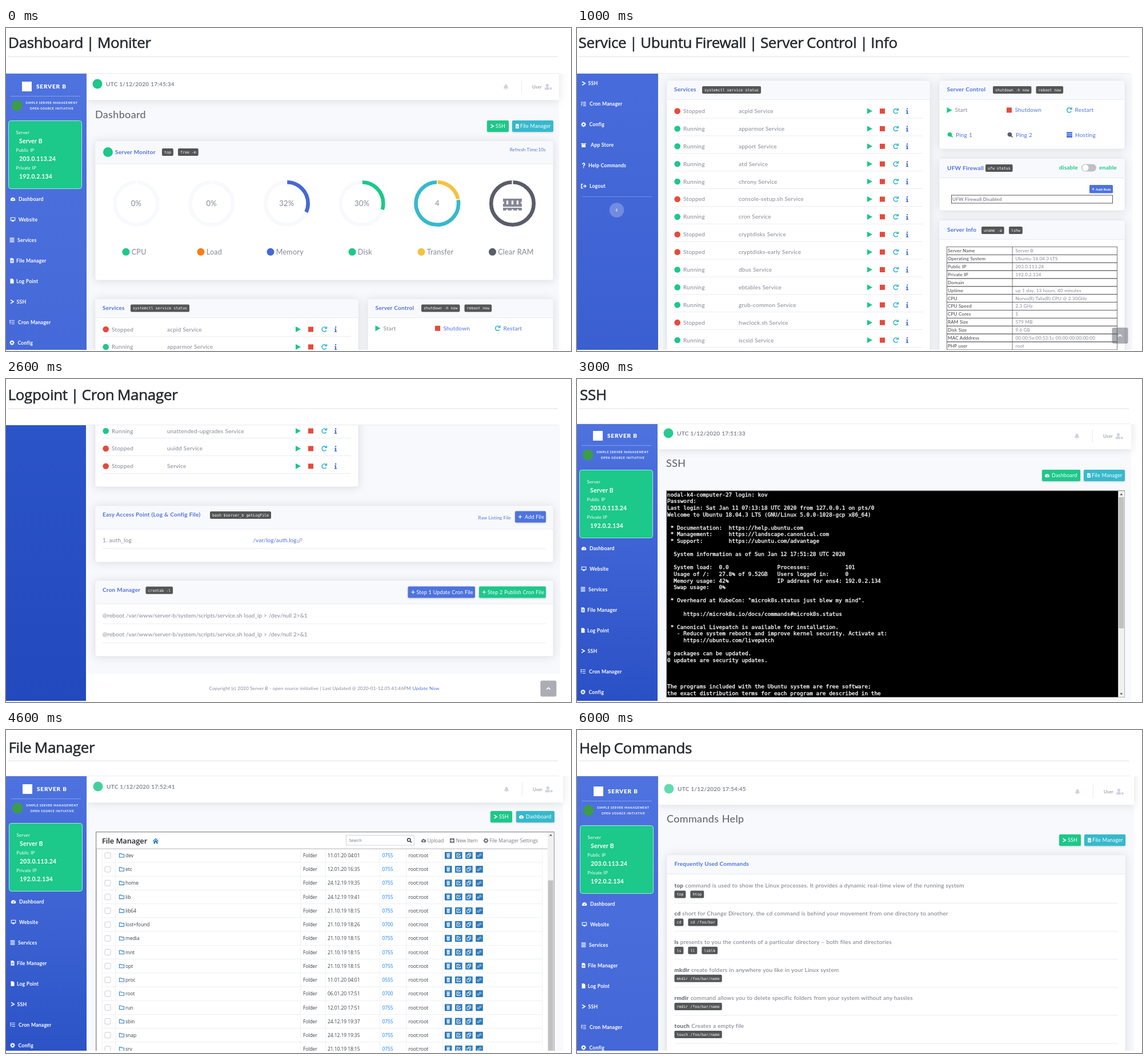
An HTML page that plays this animation: 989x566 px, repeating every 7 s.

```html
<!DOCTYPE html>
<html lang="en">
<head>
<meta charset="utf-8">
<title>Server dashboard tour</title>
<style>
html, body { margin: 0; width: 100%; height: 100%; overflow: hidden; background: #fff; }
.scene { position: absolute; left: 0; top: 0; width: 989px; height: 566px; animation: show 7s step-end infinite; animation-delay: calc((var(--i) - 7) * 1s); }
@keyframes show { 0% { visibility: visible; } 14.28572%, 100% { visibility: hidden; } }
text { font-family: Lato, sans-serif; letter-spacing: .02em; word-spacing: .02em; }
.ui { font-family: "Open Sans", "Noto Sans", sans-serif; letter-spacing: -.01em; word-spacing: 0; }
.title { letter-spacing: -.32px; word-spacing: -1px; stroke: #24292e; stroke-width: .55px; }
.code { font-family: "DejaVu Sans Mono", monospace; letter-spacing: 0; word-spacing: 0; }
.bright { stroke: #fff; stroke-width: .35px; }
.path { letter-spacing: .005em; }
.brand { letter-spacing: .08em; }
.tag { letter-spacing: .11em; }
.card { filter: drop-shadow(0 1.5px 8px rgba(58, 59, 69, .15)); }
.btn { filter: drop-shadow(0 1px 1.5px rgba(58, 59, 69, .25)); }
</style>
</head>
<body>
<script>
const GREEN = '#1cc88a', BLUE = '#4e73df', RED = '#e74a3b', CYAN = '#36b9cc', YELLOW = '#f6c23e';
const GRAY = '#858796', DARK = '#5a5c69', LINE = '#e3e6f0', PALE = '#f8f9fc', BOLD = 'font-weight="700"';
const MID = 'text-anchor="middle"';

// Icons sit in a 10 by 10 box around the origin; a second entry is a stroke width.
const ICONS = {
  play: ['M-4-5L5 0L-4 5Z'],
  stop: ['M-4.5-4.5h9v9h-9z'],
  redo: ['M3.2-2.6A4 4 0 1 0 3.6 2M4.4-5V-1.6H1', 1.6],
  info: ['M-2-1.5H1V3.5H2V5H-2V3.5H-1V0H-2ZM-1-5H1.2V-2.8H-1Z'],
  file: ['M-3.5-5H1.5L3.5-3V5H-3.5ZM-2-.5h4v1h-4zM-2 2h4v1h-4z'],
  page: ['M-3.5-5H1L3.5-2.5V5H-3.5Z'],
  gauge: ['M-5 2A5 5 0 1 1 5 2L4 4H-4ZM-.8 2.2L2-2.5L1 2.5Z'],
  desk: ['M-5-4.5H5V2.5H-5ZM-3.8-3.3V1.2H3.8V-3.3ZM-1.5 2.5H1.5L2.3 4.5H-2.3Z'],
  rows: ['M-4.5-4h9m-9 2.7h9m-9 2.6h9m-9 2.7h9', 1.5],
  prompt: ['M-3-3.6L3 0L-3 3.6', 1.9],
  list: ['M-1-3.5H5M-1 0H5M-1 3.5H5M-5-3.5l1 1 1.6-2M-5 0l1 1 1.6-2M-4.5 3.5h1.4', 1.3],
  cog: ['M-2.8 0A2.8 2.8 0 1 0 2.8 0A2.8 2.8 0 1 0-2.8 0M0-5v2M0 5v-2M-5 0h2M5 0h-2M-3.5-3.5l1.3 1.3M3.5 3.5l-1.3-1.3M-3.5 3.5l1.3-1.3M3.5-3.5l-1.3 1.3', 2],
  box: ['M-5-4L0-3L5-4L4-.8H-4ZM-4 0H4V4.5H-4Z'],
  ask: ['M-2-2.5A2.2 2.2 0 1 1 .8-.6L0 .4V1.6M0 3.2V5', 1.8],
  exit: ['M-1-4H-4.5V4H-1M-1.5 0H4.5M2-2.8L4.8 0L2 2.8', 1.6],
  bell: ['M-4.3 3C-2.5 1.5-3.5-4 0-4.5C3.5-4 2.5 1.5 4.3 3ZM-1.3 3.7H1.3A1.3 1.3 0 0 1-1.3 3.7Z'],
  user: ['M-4-2.5a2.5 2.5 0 1 1 5 0a2.5 2.5 0 1 1-5 0ZM-6 5C-6 1-4 .5-1.5 .5C0 .5 1 .8 1.6 1.6L2 5ZM2.5 3a2 2 0 1 1 4 0a2 2 0 1 1-4 0Z'],
  save: ['M-1-5H1V-1.7H3.2L0 1.6L-3.2-1.7H-1ZM-5 1.6H-2.3L0 3.6L2.3 1.6H5V5H-5Z'],
  trash: ['M-4-5H4V-3.6H-4ZM-3.4-2.8H3.4L3 5H-3ZM-1.6-1h.8v4.5h-.8zM.8-1h.8v4.5h-.8z'],
  link: ['M-.5-1.5L1.5-3.5A2 2 0 0 1 4-.8L2.2 1.2M.5 1.5L-1.5 3.5A2 2 0 0 1-4 .8L-2.2-1.2M-1.2 1.2L1.2-1.2', 1.3],
  edit: ['M1-4H-4V4H4V.5M-1.2 1.2L4-4', 1.5],
  copy: ['M-4.5-2H1V4.5H-4.5ZM-1.5-2V-4.5H4V1.5H1', 1.3],
  folder: ['M-4.5-3.5H-1L0-2.3H4.5V3.5H-4.5Z', 1.2],
  home: ['M-5.2 0L0-5L5.2 0L4.3 .8L0-3.2L-4.3 .8ZM-3.5 1.2L0-2L3.5 1.2V4.8H1V2H-1V4.8H-3.5Z'],
  cloud: ['M-3 3.5A2.4 2.4 0 0 1-3.4-1A3 3 0 0 1 2.2-2A2.8 2.8 0 0 1 3 3.5ZM0-1.2L2 .9H.7V2.6H-.7V.9H-2Z'],
  plus: ['M-4 0H4M0-4V4', 1.5],
  add: ['M-4.5-4.5h9v9h-9zM-.8-3v2.2H-3V.8H-.8V3H.8V.8H3V-.8H.8V-3Z'],
  lens: ['M-4-1A3.2 3.2 0 1 0 2.4-1A3.2 3.2 0 1 0-4-1M1.6 1.4L4.6 4.4', 1.7],
  bat: ['M-4.5-1A4 4 0 1 1 3 1.5L5 4L3.8 5L1.5 2.8A4 4 0 0 1-4.5-1Z'],
  rack: ['M-5-4.8H5V-2H-5ZM-5-1.4H5V1.4H-5ZM-5 2H5V4.8H-5Z'],
  ram: ['M-5-3.2H5V-1.6A.6.6 0 0 0 5-.4V1.1H-5V-.4A.6.6 0 0 0-5-1.6ZM-3.2-2.1v2h1v-2zM-.5-2.1v2h1v-2zM2.2-2.1v2h1v-2zM-5 1.7H5V3.1H3.2V2.4H2.5V3.1H.4V2.4H-.4V3.1H-2.5V2.4H-3.2V3.1H-5Z'],
  up: ['M-4 2L0-2L4 2', 2],
  left: ['M2-4L-2 0L2 4', 2]
};

const rect = (x, y, w, h, fill, more = '') => `<rect x="${x}" y="${y}" width="${w}" height="${h}" fill="${fill}" ${more}/>`;
const dot = (x, y, r, fill) => `<circle cx="${x}" cy="${y}" r="${r}" fill="${fill}"/>`;
const text = (x, y, s, size = 10.06, fill = GRAY, more = '') => `<text x="${x}" y="${y}" font-size="${size}" fill="${fill}" ${more}>${s}</text>`;
const ui = (x, y, s, size, fill, more = '') => text(x, y, s, size, fill, `class="ui" ${more}`);
const hline = (x1, x2, y, c = LINE) => rect(x1, y - .4, x2 - x1, .8, c);
const move = (dx, dy, s) => `<g transform="translate(${dx} ${dy})">${s}</g>`;
const each = (list, fn) => list.map(fn).join('');

function icon(name, x, y, color, size = 10) {
  const [d, w] = ICONS[name];
  const paint = w ? `fill="none" stroke="${color}" stroke-width="${w}"` : `fill="${color}" fill-rule="evenodd"`;
  return `<path d="${d}" ${paint} transform="translate(${x} ${y}) scale(${size / 10})"/>`;
}
const kbd = (x, y, s) => rect(x, y - 6.5, s.length * 3.96 + 8, 13, '#545557', 'rx="2"') +
  text(x + 4, y + 2.3, s, 6.58, '#fff', 'class="code"');
const heading = (x, y, s) => text(x, y, s, 18, DARK);
const head = (x, y, s) => text(x, y, s, 10.06, BLUE, BOLD);
const card = (x, y, w, h, top) => rect(x, y, w, h, '#fff', `rx="3.5" stroke="${LINE}" stroke-width=".7" class="card"`) +
  (top ? rect(x + .4, y + .4, w - .8, top, PALE, 'rx="3"') + hline(x, x + w, y + top) : '');
const button = (x, y, w, color, pic, label, gap = 15) => rect(x, y, w, 20, color, 'rx="2" class="btn"') +
  icon(pic, x + 9, y + 10, '#fff', 8) + text(x + gap, y + 13.3, label, 9, '#fff');
const fileButton = (x, y) => button(x, y, 72, CYAN, 'file', 'File Manager', 14);
const sshButton = (x, y) => button(x, y, 38, GREEN, 'prompt', 'SSH');
const toTop = (x, y) => rect(x, y, 28, 28, DARK, 'rx="3" opacity=".5"') + icon('up', x + 14, y + 14, '#fff', 8);

const HOST = 'Server B', PUBLIC = '203.0.113.24', PRIVATE = '192.0.2.134';
const MENU = [['gauge', 'Dashboard', 22], ['desk', 'Website', 22], ['rows', 'Services', 20], ['file', 'File Manager', 18],
  ['page', 'Log Point', 18], ['prompt', 'SSH', 18.5], ['list', 'Cron Manager', 21], ['cog', 'Config', 20.5],
  ['box', 'App Store', 23], ['ask', 'Help Commands', 19], ['exit', 'Logout', 21]];

function sidebar() {
  const facts = [['Server', HOST], ['Public IP', PUBLIC], ['Private IP', PRIVATE]];
  return rect(28, 94, 17, 17, '#fff') +
    text(53, 106, 'SERVER B', 10.06, '#fff', 'font-weight="900" class="brand"') +
    hline(8, 130, 119.5, '#94abec') + dot(19, 136, 9.5, '#3c9c4a') +
    text(80, 133, 'SIMPLE SERVER MANAGEMENT', 5.2, '#fff', `${BOLD} ${MID} class="tag"`) +
    text(80, 143, 'OPEN SOURCE INITIATIVE', 5.2, '#fff', `${BOLD} ${MID} class="tag"`) +
    rect(4.5, 162.5, 128, 119, GREEN, 'rx="4" stroke="#a4ecd2"') +
    each(facts, ([k, v], i) => text(17.5, 186.2 + i * 30.9, k, 8, '#fff') + text(23, 201.7 + i * 30.9, v, 10.4, '#fff', BOLD)) +
    each(MENU, ([pic, s, x], i) => icon(pic, pic === 'desk' || pic === 'gauge' ? 12 : 10.5, 299.5 + i * 36, '#fff', 8.6) +
      text(x, 302.6 + i * 36, s, 8.7, '#fff', BOLD)) +
    hline(8, 130, 678, '#7e9ae8') + '<circle cx="68.5" cy="701.5" r="12.8" fill="#fff" opacity=".25"/>' +
    icon('left', 68.5, 701.5, '#dfe6fa', 6);
}

function topbar(time, glow, right) {
  return rect(141, 50, right - 141, 76, '#fff', 'class="card"') + dot(160, 98, 8.5, glow) +
    text(175, 101.8, 'UTC 1/12/2020 ' + time, 10.06, GRAY, BOLD) + icon('bell', 875, 103, '#d1d3e2') +
    rect(902, 91, .8, 24, LINE) + text(921, 106, 'User', 8) + icon('user', 949, 103, '#d1d3e2', 10.5);
}

// One scrollable view: side bar, header and body, moved together.
const shell = (dx, dy, right, time, glow, body, side) => rect(141, 0, right - 141, 566, PALE) + body +
  move(dx, dy, topbar(time, glow, right - dx)) + side + move(dx, dy, sidebar());

function arc(x, from, to, color) {
  return `<circle cx="${x}" cy="307.5" r="37.3" fill="none" stroke="${color}" stroke-width="6.6" pathLength="100"
    stroke-dasharray="${to - from} 100" stroke-dashoffset="${-from}" transform="rotate(-90 ${x} 307.5)"/>`;
}
const notch = (x, pct) => `<rect x="${x - .8}" y="266" width="1.6" height="9" fill="#fff" transform="rotate(${pct * 3.6} ${x} 307.5)"/>`;

function monitor() {
  const gauges = [['CPU', '0%', GREEN, 0, 210], ['Load', '0%', '#fd7e14', 0, 341], ['Memory', '32%', '#4468d6', 32, 463],
    ['Disk', '30%', GREEN, 30, 606], ['Transfer', '4', YELLOW, 22, 727], ['Clear RAM', '', DARK, 100, 851.5]];
  return heading(156, 157.5, 'Dashboard') + sshButton(842, 162) + fileButton(886, 162) +
    card(156, 198, 802, 244, 40) + dot(178.5, 217.5, 8.5, GREEN) + head(191, 220.5, 'Server Monitor') +
    kbd(273, 217.5, 'top') + kbd(301, 217.5, 'free -m') + text(945, 215.6, 'Refresh Time:10s', 8, BLUE, 'text-anchor="end"') +
    each(gauges, ([name, value, color, pct, x], i) => {
      const cx = 228 + i * 131.7;
      return arc(cx, pct, 100, name === 'Transfer' ? CYAN : PALE) + (pct ? arc(cx, 0, pct, color) : '') +
        notch(cx, 0) + notch(cx, pct) + text(cx, 312.2, value, 13, GRAY, MID) +
        dot(x, 392.3, 6.5, color) + text(x + 9.7, 397, name, 12.6);
    }) + icon('ram', 886.5, 309.5, GRAY, 33);
}

const actions = (x, y) => icon('play', x, y, GREEN) + icon('stop', x + 22.5, y, RED) + icon('redo', x + 46, y, CYAN) + icon('info', x + 66, y, BLUE);
function service(name, y) {
  const off = name[0] === '!';
  return dot(174.7, y, 5.3, off ? RED : GREEN) + text(185, y + 3.5, off ? 'Stopped' : 'Running') +
    text(282, y + 3.5, name.replace('!', '')) + actions(511, y) + hline(169, 604, y + 12.5);
}

function lowerCards() {
  const names = ['!acpid', 'apparmor', 'apport', 'atd', 'chrony', '!console-setup.sh', 'cron', '!cryptdisks', '!cryptdisks-early',
    'dbus', 'ebtables', 'grub-common', '!hwclock.sh', 'iscsid'];
  const info = [['Server Name', HOST], ['Operating System', 'Ubuntu 18.04.3 LTS'], ['Public IP', PUBLIC], ['Private IP', PRIVATE],
    ['Domain', ''], ['Uptime', 'up 1 day, 13 hours, 40 minutes'], ['CPU', 'Norvo(R) Talix(R) CPU @ 2.30GHz'], ['CPU Speed', '2.3 GHz'],
    ['CPU Cores', '1'], ['RAM Size', '579 MB'], ['Disk Size', '9.6 GB'], ['MAC Adddress', '00:00:5e:00:53:1c 00:00:00:00:00:00'], ['PHP user', 'root']];
  const cell = (x, pic, color, s, y, ink = BLUE, gap = 10) => icon(pic, x, y, color) + text(x + gap, y + 3.5, s, 10.06, ink);
  return card(156, 474.5, 461, 600, 33) + head(169, 493.6, 'Services') + kbd(218, 491, 'systemctl service status') +
    each(names, (n, i) => service(n + ' Service', 528 + i * 30.88)) +
    card(633, 474.5, 325, 120, 33) + head(646.5, 493.6, 'Server Control') + kbd(727, 491, 'shutdown -h now') + kbd(802.5, 491, 'reboot now') +
    cell(650.5, 'play', GREEN, 'Start', 526.3, GRAY) + cell(755.5, 'stop', RED, 'Shutdown', 526.3) + cell(860.5, 'redo', CYAN, 'Restart', 526.3) +
    cell(652, 'bat', GREEN, 'Ping 1', 569.5) + cell(757, 'bat', DARK, 'Ping 2', 569.5) + cell(861, 'rack', BLUE, 'Hosting', 569.5) +
    move(-1, 382.4, card(634, 228.5, 325, 91.5, 34) + head(648, 248.5, 'UFW Firewall') + kbd(715, 245.5, 'ufw status') +
      text(844, 248.3, 'disable', 10.06, GREEN, BOLD) + text(914, 248.3, 'enable', 10.06, GREEN, BOLD) +
      rect(883, 238.5, 26, 13, '#c0c0c4', 'rx="6.5"') + dot(890, 245, 5.5, '#fff') +
      rect(897, 275, 41, 14.5, BLUE, 'rx="1.5"') + icon('plus', 903.5, 282.3, '#fff', 5.5) + text(908, 284.5, 'Add Rule', 6.4, '#fff', BOLD) +
      rect(655.5, 293, 282, 14, 'none', 'stroke="#444" stroke-width=".9"') + text(657, 302.9, 'UFW Firewall Disabled', 8.1, GRAY, BOLD) +
      card(634, 336.5, 325, 330, 34) + head(648, 357, 'Server Info') + kbd(708, 354.5, 'uname -a') + kbd(756, 354.5, 'lshw') +
      each(info, ([k, v], i) => {
        const y = 383.5 + i * 13.87;
        return rect(647.5, y, 298, 13.87, 'none', 'stroke="#555" stroke-width=".8"') + rect(761.7, y, .8, 13.87, '#555') +
          text(649, y + 9.9, k, 8.1, '#3c3d45') + text(767.5, y + 9.9, v, 8.1);
      }));
}

function logs() {
  const job = '@reboot /var/www/server-b/system/scripts/service.sh load_ip > /dev/null 2>&1';
  const path = (x, y, s, color) => text(x, y, s, 10.06, color, 'class="path"');
  return rect(141, 0, 829, 566, PALE) + card(156, 40, 461, 149) +
    each(['unattended-upgrades Service', '!uuidd Service', '!Service'], (n, i) => service(n, 91 + i * 30.9)) +
    card(156, 222, 802, 99, 41) + head(169, 241, 'Easy Access Point (Log & Config File)') + kbd(357, 238.5, 'bash $server_b getLogFile') +
    text(884, 245.5, 'Raw Listing File', 8, BLUE, 'text-anchor="end"') + button(891, 231.5, 54, BLUE, 'plus', 'Add File', 17) +
    text(169, 286.3, '1. auth_log') + path(432.5, 286.3, '/var/log/auth.log', BLUE) + icon('link', 514, 283, '#b7b9cc') + hline(169, 945, 297) +
    card(156, 353, 802, 133, 41) + head(169, 373, 'Cron Manager') + kbd(244.5, 370.3, 'crontab -l') +
    button(703.5, 363.5, 117.5, BLUE, 'plus', 'Step 1 Update Cron File') + button(828, 363.5, 117, GREEN, 'plus', 'Step 2 Publish Cron File') +
    path(169, 418, job, GRAY) + hline(169, 945, 429) + path(169, 451.2, job, GRAY) + hline(169, 945, 462) + rect(141, 517, 829, 50, '#fff') +
    text(557, 544.8, `Copyright (c) 2020 Server B - open source initiative | Last Updated @ 2020-01-12.05:41:46PM <tspan fill="${BLUE}">Update Now</tspan>`, 8.15, GRAY, MID) +
    toTop(935.5, 528.5);
}

const SESSION = `nodal-k4-computer-27 login: kov
Password:
Last login: Sat Jan 11 07:13:18 UTC 2020 from 127.0.0.1 on pts/0
Welcome to Ubuntu 18.04.3 LTS (GNU/Linux 5.0.0-1028-gcp x86_64)

 * Documentation:  https://help.ubuntu.com
 * Management:     https://landscape.canonical.com
 * Support:        https://ubuntu.com/advantage

  System information as of Sun Jan 12 17:51:28 UTC 2020

  System load:  0.0               Processes:           101
  Usage of /:   27.8% of 9.52GB   Users logged in:     0
  Memory usage: 42%               IP address for ens4: ${PRIVATE}
  Swap usage:   0%

 * Overheard at KubeCon: "microk8s.status just blew my mind".

     https://microk8s.io/docs/commands#microk8s.status

 * Canonical Livepatch is available for installation.
   - Reduce system reboots and improve kernel security. Activate at:
     https://ubuntu.com/livepatch

0 packages can be updated.
0 updates are security updates.



The programs included with the Ubuntu system are free software;
the exact distribution terms for each program are described in the`;

const arrow = (x, y, d) => `<path d="M${x - 2.5} ${y - d}h5l-2.5 ${3 * d}z" fill="#505050"/>`;
const terminal = () => heading(156, 154, 'SSH') + button(814, 159, 67, GREEN, 'gauge', 'Dashboard', 17) + fileButton(887, 159) +
  rect(156, 195, 803, 363, '#9a9a9a') + rect(157.3, 196.3, 790, 361, '#000') + rect(947.3, 196.3, 11, 361, '#f1f1f1') +
  rect(948.3, 207, 9, 230, '#c1c1c1') + arrow(952.8, 202.5, -1) + arrow(952.8, 551.5, 1) +
  each(SESSION.split('\n'), (s, i) => text(158, 205.7 + i * 11.6, s, 9.42, '#fff', 'class="code bright" xml:space="preserve"'));

function files() {
  const base = '21.10.19 18:15';
  const rows = [['dev', '11.01.20 04:01'], ['etc', '12.01.20 16:35'], ['home', '24.12.19 19:35'], ['lib', '24.12.19 19:41'], ['lib64', base],
    ['lost+found', '21.10.19 18:26', '0700'], ['media', base], ['mnt', base], ['opt', base], ['proc', '11.01.20 04:01', '0555'],
    ['root', '06.01.20 17:51', '0700'], ['run', '12.01.20 17:51'], ['sbin', '24.12.19 19:37'], ['snap', '24.12.19 19:35'], ['srv', base]];
  const tools = [['cloud', 'Upload', 731], ['add', 'New Item', 781], ['cog', 'File Manager Settings', 840]];
  return sshButton(848, 142) + button(893, 142, 67, CYAN, 'gauge', 'Dashboard', 17) +
    rect(157, 178, 803, 390, '#8f8f8f') + rect(158.5, 179.5, 800.5, 390, '#fff') +
    each([168, 191, 515, 559, 654, 700, 764, 938], x => rect(x, 208, .7, 360, '#e9ebee')) +
    each(rows, ([name, date, mode = '0755'], i) => {
      const y = 219.8 + i * 24.23, b = y + 3.2;
      return hline(168, 938, y + 12.1, '#e9ebee') + rect(173, y - 5, 10, 10, '#fff', 'rx="2" stroke="#b9bfc6" stroke-width=".8"') +
        icon('folder', 202.5, y, '#2f80c2', 9) + ui(209, b, name, 8.6, '#3b4147') + ui(520, b, 'Folder', 8.5, '#3b4147') +
        ui(563, b, date, 8.5, '#3b4147') + ui(658.5, b, mode, 8.5, '#1283f5') + ui(704.5, b, 'root:root', 8.5, '#3b4147') +
        each(['trash', 'edit', 'copy', 'link'], (pic, k) => rect(768 + k * 18.1, y - 6, 12.5, 12, '#2a78b8') +
          icon(pic, 774.2 + k * 18.1, y, '#fff', 7.6));
    }) +
    rect(158.5, 179.5, 789.5, 28, '#fff') + hline(158.5, 948, 208, '#a4a4a4') + hline(158.5, 948, 209, '#e2e2e2') +
    ui(168, 199, 'File Manager', 13, '#212529', 'font-weight="600"') + icon('home', 262, 194.5, '#2176c7') +
    rect(595.5, 184.5, 119, 17.5, '#fff', 'stroke="#ced4da"') + ui(600.5, 196.2, 'Search', 7.2, '#6c757d') + icon('lens', 706, 193.5, '#333', 8.5) +
    each(tools, ([pic, s, x]) => icon(pic, x, 193.8, '#6f7479', 8.8) + ui(x + 6.5, 197, s, 8.7, '#777b80')) +
    rect(948, 179.5, 11, 390, '#f1f1f1') + rect(948.8, 263.5, 9, 310, '#c1c1c1') + arrow(953.5, 184.5, -1);
}

function apps() {
  // name, text centre, logo centre, logo colour, top edge, has actions
  const list = [['NGINX', 240.5, 198, '#119a49', 1], ['PHP', 343.5, 301, '#7377ad', 1], ['APACHE', 439, 397, '#c9302f', 0, 1],
    ['NODEJS', 545, 503, '#83bf3b', 1, 1], ['PYTHON', 651, 609, '#3f7ab5', 1], ['GOLANG', 753, 711, '#6ad0e4', 0, 1], ['MYSQL', 858.5, 816, '#12718c', 1, 1],
    ['POSTGRES', 233, 190, '#336791', 0, 1], ['MONGODB', 340, 298, '#4faa41', 0, 1], ['ELS.SEARCH', 438.5, 397, '#1ba9a0', 0, 1],
    ['REDIS', 544.5, 502, '#c02f2a', 0, 1], ['NPM', 652.5, 610, '#cb3837', 1, 1], ['JUPYTER', 752, 710, '#f37726', 0, 1], ['SHELLBOX', 853, 810, '#1f2225', 1]];
  return heading(157, 157, 'App Store') + button(815, 162, 67, GREEN, 'gauge', 'Dashboard', 17) + fileButton(888, 162) +
    card(157, 198, 803, 188, 34) + head(171, 217, 'Apps') +
    each(list, ([name, cx, lx, color, on, act], i) => {
      const low = i > 6, x = 177.5 + i % 7 * 103, y = low ? 309 : 244.5;
      const shape = name === 'SHELLBOX' ? rect(lx - 11, 324, 22, 22, color) : dot(lx, low ? 335 : 271, low ? 9.5 : 13, color);
      return rect(x, y, 95.5, 54, '#fff', `rx="2" stroke="${LINE}" stroke-width=".8"`) + rect(x, y - .5, 95.5, 1.9, on ? GREEN : RED, 'rx=".8"') +
        shape + text(cx, low ? 329 : 265.3, name, 10.3, DARK, MID) +
        (act ? icon('save', cx - 11.2, low ? 343 : 280, GREEN, 10.5) + icon('trash', cx + 11.6, low ? 343 : 280, RED, 10.5) : '');
    });
}

function help() {
  const list = [['top', 'command is used to show the Linux processes. It provides a dynamic real-time view of the running system', 'top', 'htop'],
    ['cd', 'short for Change Directory, the cd command is behind your movement from one directory to another', 'cd', 'cd /foo/bar'],
    ['ls', 'presents to you the contents of a particular directory – both files and directories', 'ls', 'll', 'lsblk'],
    ['mkdir', 'create folders in anywhere you like in your Linux system', 'mkdir /foo/bar/name'],
    ['rmdir', 'command allows you to delete specific folders from your system without any hassles', 'rmdir /foo/bar/name'],
    ['touch', 'Creates a empty file', 'touch /foo/bar/name']];
  return heading(157, 162, 'Commands Help') + sshButton(844, 183) + fileButton(888, 183) +
    card(157, 219, 803, 380, 33.5) + head(170.5, 238.3, 'Frequently Used Commands') +
    each(list, ([cmd, about, ...keys], i) => {
      const y = 276.3 + i * 49.1;
      let x = 170.5;
      return text(170.5, y, `<tspan ${BOLD} fill="${DARK}">${cmd}</tspan> ${about}`, 10.06, '#777987') +
        each(keys, k => { const s = kbd(x, y + 11.7, k); x += k.length * 3.96 + 16; return s; }) + hline(170.5, 947, y + 27.3);
    });
}

let count = 0;
function scene(title, x, base, rule, y0, y1, colors, width, draw) {
  const i = count++, h = y1 - y0;
  const side = rect(0, y0, width, h, `url(#side${i})`);
  return `<svg class="scene" style="--i:${i}" viewBox="0 0 989 566">
    <linearGradient id="side${i}" x2="0" y2="1"><stop stop-color="${colors[0]}"/><stop offset="1" stop-color="${colors[1]}"/></linearGradient>
    ${rect(0, 0, 989, 566, '#fff')}${text(x, base, title, 26, '#24292e', 'class="ui title"')}${hline(3, 966, rule, '#d4d6d9')}
    ${hline(0, 968, y0 - .4, '#e6e7ec')}<svg y="${y0}" width="989" height="${h}" viewBox="0 ${y0} 989 ${h}">${draw(side)}</svg></svg>`;
}

const dash = () => monitor() + lowerCards();
document.body.innerHTML = [
  scene('Dashboard | Moniter', 4, 34.5, 50, 80, 564, [BLUE, '#4569d8'], 141,
    s => shell(0, 0, 968, '17:45:34', GREEN, dash(), s)),
  scene('Service | Ubuntu Firewall | Server Control | Info', 2.5, 34.5, 50, 80, 564, ['#486cdb', '#3a5fd0'], 142,
    s => shell(1, -382.4, 972, '17:45:34', GREEN, move(1, -382.4, dash()) + toTop(936.5, 525), s)),
  scene('Logpoint | Cron Manager', 3.5, 36.5, 52, 81, 564, ['#2c54c9', '#2249be'], 140, s => logs() + s),
  scene('SSH', 5, 37, 52, 79, 564, [BLUE, '#2a50c6'], 141,
    s => shell(0, -3, 970, '17:51:33', '#27cb90', terminal(), s)),
  scene('File Manager', 4.5, 39.5, 54, 81, 562, [BLUE, '#2c53c7'], 141,
    s => shell(1, 1, 975, '17:52:41', '#42d09e', files(), s)),
  scene('App Store', 8.5, 39.5, 54, 81, 562, [BLUE, '#2a50c6'], 142,
    s => shell(1, -.6, 973, '17:53:45', '#35cf98', apps(), s)),
  scene('Help Commands', 4, 40.5, 54, 81, 562, [BLUE, '#4467d7'], 142,
    s => shell(1, 5, 975, '17:54:45', '#62dbb0', help(), s))
].join('');
</script>
</body>
</html>
```
